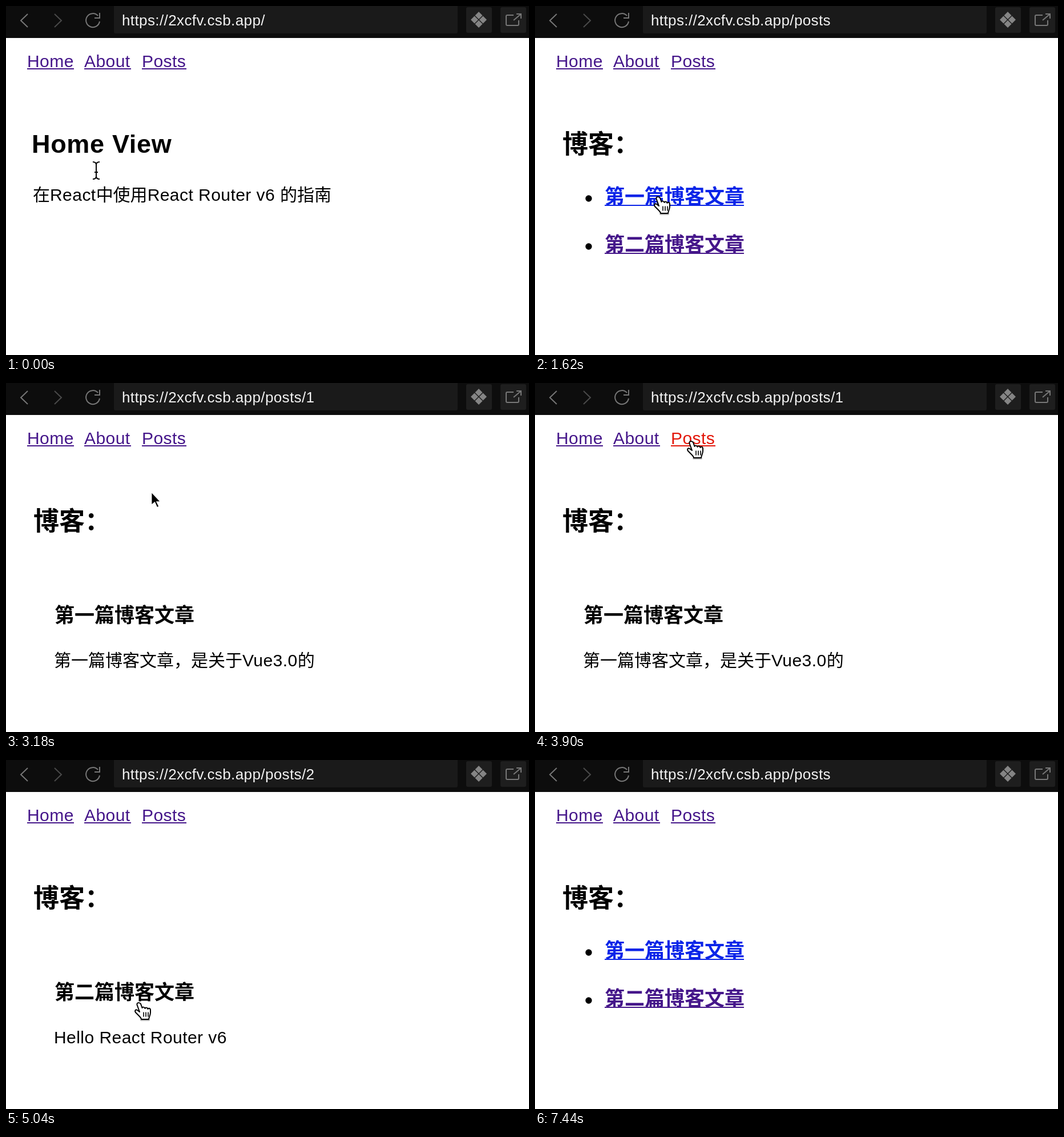
An HTML page that plays this animation: 916 by 611 pixels, repeating every 7.5 s.

```html
<!DOCTYPE html>
<html lang="zh-CN">
<head>
<meta charset="utf-8">
<style>
html, body { margin: 0; width: 100%; height: 100%; overflow: hidden; background: #fff; }
svg { display: block; width: 916px; height: 611px; }
text { font: 30px "Liberation Sans", "Noto Sans CJK SC", "Noto Sans CJK", sans-serif; white-space: pre; }
tspan { letter-spacing: .015em; }
.h2 { font-size: 45px; font-weight: 700; }
.h3 { font-size: 35px; font-weight: 700; }
.url { font-size: 26px; fill: #f2f2f2; }
.line { fill: none; stroke-width: 2; }
</style>
</head>
<body>
<svg viewBox="0 0 916 611">
  <rect width="916" height="56" fill="#0d0d0d"/>
  <rect x="189" y="-4" width="602" height="52" rx="3" fill="#1a1a1a"/>
  <rect x="806" y="2" width="45" height="45" rx="3" fill="#1e1e1e"/>
  <rect x="866" y="2" width="45" height="45" rx="3" fill="#1e1e1e"/>
  <g class="line">
    <path d="M38 14L26 25.500L38 37" stroke="#777"/>
    <path d="M85 14L97 25.500L85 37" stroke="#4a4a4a"/>
    <path d="M161 17A12 12 0 1 0 164 27M164 12V21H155" stroke="#777"/>
    <path d="M889 16H878Q876 16 876 18V32Q876 34 878 34H896Q898 34 898 32V25M889 25L902 14M894 14H902V22" stroke="#777"/>
  </g>
  <path d="M828 10l6.500 6.500l-6.500 6.500l-6.500-6.500zM828 25l6.500 6.500l-6.500 6.500l-6.500-6.500zM820.500 17.500l6.500 6.500l-6.500 6.500l-6.500-6.500zM835.500 17.500l6.500 6.500l-6.500 6.500l-6.500-6.500z" fill="#858585"/>
  <g id="page"></g>
  <g id="cursor"></g>
</svg>
<script>
const LOOP = 7500, STEP = 60;
const PURPLE = '#45168a', BLUE = '#0a24e8', RED = '#e3170a';
const pageBox = document.getElementById('page');
const cursorBox = document.getElementById('cursor');

const text = (x, y, str, cls = '', fill = '#000') =>
  `<text x="${x}" y="${y}" class="${cls}" ${cls === 'url' ? '' : `fill="${fill}"`}>` +
  str.replace(/[ -~]+/g, '<tspan>$&</tspan>') + '</text>';

const link = (x, y, width, str, fill, cls) =>
  text(x, y, str, cls, fill) +
  `<rect x="${x}" y="${y + 2}" width="${width}" height="2" fill="${fill}"/>`;

const bullet = y => `<circle cx="94" cy="${y}" r="5.7"/>`;
const blog = text(48, 258, '博客：', 'h2');
const post = (title, body) => blog + text(85, 419, title, 'h3') + text(84, 496, body);

const pages = {
  home: ['', text(45, 257, 'Home View', 'h2') + text(47, 341, '在React中使用React Router v6 的指南')],
  list: ['posts', blog +
    bullet(337) + link(122, 346, 244, '第一篇博客文章', BLUE, 'h3') +
    bullet(421) + link(122, 430, 244, '第二篇博客文章', PURPLE, 'h3')],
  first: ['posts/1', post('第一篇博客文章', '第一篇博客文章，是关于Vue3.0的')],
  second: ['posts/2', post('第二篇博客文章', 'Hello React Router v6')]
};

const visits = [[0, 'home'], [840, 'list'], [1800, 'first'], [3960, 'list'], [4860, 'second'], [6420, 'list']];
const presses = [[720, 840], [3840, 3960], [6360, 6420]];

// time, x, y, cursor shape while resting
const path = [
  [0, 158, 288, 'beam'], [120, 158, 288],
  [600, 262, 90, 'hand'], [960, 262, 90],
  [1500, 216, 334, 'hand'], [2400, 216, 334],
  [2760, 250, 210, 'arrow'], [3000, 250, 210],
  [3660, 274, 102, 'hand'], [3960, 274, 102],
  [4620, 233, 425, 'hand'], [5160, 233, 425],
  [5940, 281, 98, 'hand'], [6480, 281, 98],
  [7380, 300, 645, 'arrow'], [LOOP, 300, 645]
];

const beam = 'M-6-15Q0-15 0-10V10Q0 15-6 15M6-15Q0-15 0-10M0 10Q0 15 6 15M-3 3H3';
const shapes = {
  beam: `<path d="${beam}" class="line" stroke="#fff" style="stroke-width:4"/><path d="${beam}" class="line" stroke="#000"/>`,
  arrow: '<path d="M0 0V24L6 19L10 28L14 26L10 18H17Z" stroke="#fff" stroke-width="2"/>',
  hand: '<g stroke-linejoin="round" stroke-linecap="round">' +
    '<path d="M4 30H17" stroke="#000" stroke-width="4" opacity=".25"/>' +
    '<path d="M-1 0C-4 0-4 3-3 5L1 16L-3 13C-6 11-8 14-6 17L0 23C3 26 4 27 4 29H17C17 26 20 22 20 17V13C20 9 16 9 15.500 11C15 8 11 8 10.500 10C9.500 7 6 7 5.500 9L3 2C2 0 0 0-1 0Z" fill="#fff" stroke="#000" stroke-width="2"/>' +
    '<path d="M8 17v7M12 17v7M16 17v7" stroke="#000" stroke-width="1.6"/></g>'
};

const inside = (x, y, l, t, r, b) => x >= l && x <= r && y >= t && y <= b;

function hover(x, y, name) {
  if (inside(x, y, 238, 82, 316, 112)) return 'hand';
  if (name === 'list' && (inside(x, y, 122, 315, 366, 352) || inside(x, y, 122, 399, 366, 436))) return 'hand';
  if (inside(x, y, 48, 218, name === 'home' ? 289 : 160, 265)) return 'beam';
  return 'arrow';
}

function pointer(t, name) {
  const i = path.findIndex((k, n) => t < path[n + 1][0]);
  const [t0, x0, y0, rest] = path[i], [t1, x1, y1] = path[i + 1];
  const p = (t - t0) / (t1 - t0), e = p * p * (3 - 2 * p);
  const x = x0 + (x1 - x0) * e, y = y0 + (y1 - y0) * e;
  return `<g transform="translate(${x} ${y})">${shapes[rest || hover(x, y, name)]}</g>`;
}

let shown = '';
function draw() {
  const now = performance.now() % LOOP, t = now - now % STEP;
  const name = visits.filter(v => v[0] <= t).pop()[1];
  const pressed = presses.some(([a, b]) => t >= a && t < b);
  const [route, body] = pages[name];
  if (shown !== name + pressed) {
    shown = name + pressed;
    pageBox.innerHTML = text(203, 34, 'https://2xcfv.csb.app/' + route, 'url') +
      link(37, 107, 82, 'Home', PURPLE) + link(137, 107, 82, 'About', PURPLE) +
      link(238, 107, 78, 'Posts', pressed ? RED : PURPLE) + body;
  }
  cursorBox.innerHTML = pointer(t, name);
  requestAnimationFrame(draw);
}
draw();
</script>
</body>
</html>
```
